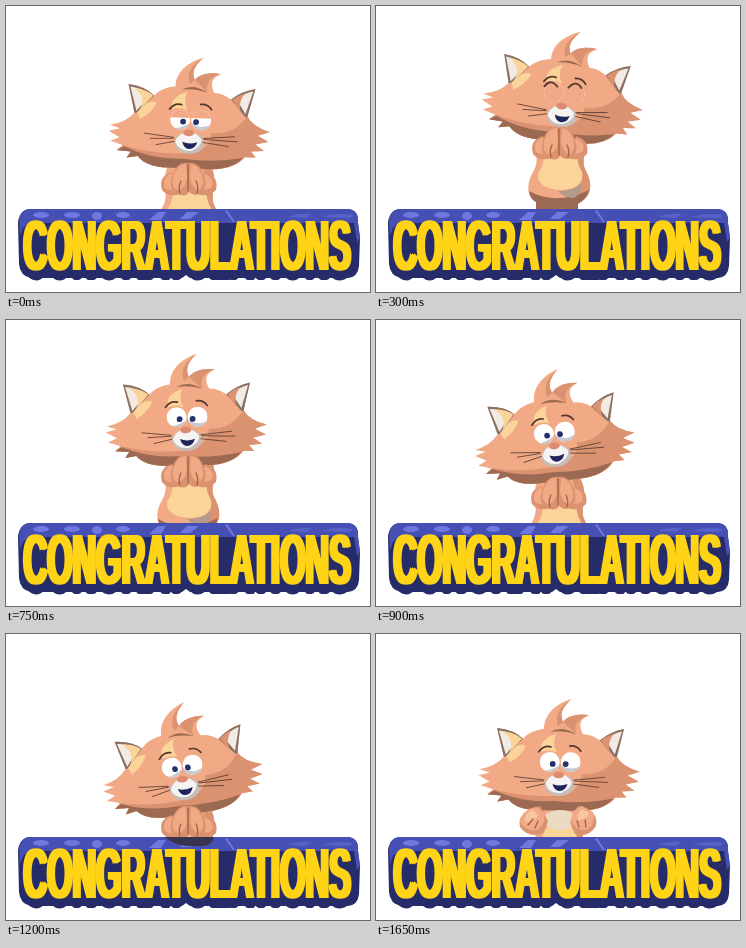
An HTML page without scripts for the animation above (1.8 s loop, 364 by 286 pixels).

```html
<!DOCTYPE html>
<html lang="en">
<head>
<meta charset="utf-8">
<title>Congratulations</title>
<style>
  html, body { margin: 0; width: 100%; height: 100%; overflow: hidden; background: #fff; }
  svg { display: block; width: 364px; height: 286px; }

  .head, .body, .lids, .shut, .clasped, .apart, .reflection { animation: 1.8s step-end infinite; }
  .head { animation-name: nod; transform-origin: 184.5px 94.5px; }
  .body { animation-name: bob; }
  .lids { animation-name: blink; }
  .shut { animation-name: shut; }
  .clasped { animation-name: clasp; }
  .apart { animation-name: part; }
  .reflection { animation-name: reflect; }

  @keyframes nod {
    0%      { translate: 1.5px -14px;  rotate: 2.3deg; }
    8.333%  { translate: 5px -29px;    rotate: 4deg; }
    16.666% { translate: 7px -40.5px;  rotate: 5.5deg; }
    25%     { translate: 5px -47px;    rotate: 6deg; }
    33.333% { translate: 2px -43.5px;  rotate: 4.5deg; }
    41.666% { translate: -4px -31px;   rotate: -1deg; }
    50%     { translate: -10px -15px;  rotate: -6.6deg; }
    58.333% { translate: -13px -2px;   rotate: -8.5deg; }
    66.666% { translate: -13px 4.5px;  rotate: -8deg; }
    75%     { translate: -9px 5px;     rotate: -5deg; }
    83.333% { translate: -5px 4.5px;   rotate: -1.8deg; }
    91.666% { translate: 0 0;          rotate: .5deg; }
  }
  @keyframes bob {
    0%      { translate: -1px 36px; }
    8.333%  { translate: 0 16px; }
    16.666% { translate: 0 0; }
    25%     { translate: 0 -5px; }
    33.333% { translate: 0 -2px; }
    41.666% { translate: -1px 14px; }
    50%     { translate: -1px 36px; }
    58.333% { translate: -1px 48px; }
    66.666%, 75%, 83.333%, 91.666% { translate: -1px 51px; }
  }
  @keyframes blink {
    0%     { translate: 0 -14px; }
    8.333% { translate: 0 0; }
    25%    { translate: 0 -14px; }
    33.333%, 100% { translate: 0 -26px; }
  }
  @keyframes shut {
    0%     { visibility: hidden; }
    8.333% { visibility: visible; }
    25%, 100% { visibility: hidden; }
  }
  @keyframes clasp { 0% { visibility: visible; } 91.666%, 100% { visibility: hidden; } }
  @keyframes part  { 0% { visibility: hidden; } 91.666%, 100% { visibility: visible; } }
  @keyframes reflect {
    0%      { visibility: hidden; }
    58.333% { visibility: visible; }
    91.666%, 100% { visibility: hidden; }
  }

  .fur { fill: #f2aa86; }
  .pale { fill: #f8c4a2; }
  .shade { fill: #db9270; }
  .deep { fill: #9c6a53; }
  .cream { fill: #fbd49a; }
  .line { fill: none; stroke: #54382f; stroke-width: .8; stroke-linecap: round; }
  .fold { fill: none; stroke: #a5613f; stroke-width: 1.3; stroke-linecap: round; }
  .word { font: bold 70px "Liberation Sans", Arial, sans-serif; }
</style>
</head>
<body>
<svg viewBox="0 0 364 286">
  <defs>
    <clipPath id="above"><path d="M0 0H364V212H0Z"/></clipPath>
    <clipPath id="eyes">
      <ellipse cx="174" cy="128" rx="10" ry="10"/>
      <ellipse cx="195" cy="128" rx="10" ry="10"/>
    </clipPath>
    <g id="word" class="word" transform="translate(17.5 264) scale(.467 1)">
      <text>CONGRATULATIONS</text>
    </g>
  </defs>

  <g clip-path="url(#above)">
    <g class="body">
      <path class="fur" d="M164 122C154 140 166 152 157 166C149 180 152 192 160 196V224H202V197C216 192 217 178 210 165C203 152 215 140 205 122Z"/>
      <path class="shade" d="M205 122C215 140 203 152 210 165C217 178 216 192 202 197L194 198C206 188 208 174 203 164C198 152 203 140 197 122Z"/>
      <path class="cream" d="M168 144Q185 138 202 145Q200 156 206 166Q209 182 186 184Q161 183 162 168Q169 158 168 144Z"/>
      <path class="deep" d="M153 185Q180 200 213 184Q211 193 202 198V224H188L186 200L182 224H160V196Q154 193 153 185Z"/>
      <path fill="#b39a8c" d="M182 185Q198 185 205 177Q207 187 198 192Q188 192 182 185Z"/>
    </g>
  </g>

  <g class="head">
    <path class="fur" d="M128 123L121 94.5Q138 96 147 105Q154 97 168 95C168 80 180 70 195 65C187 73 183 79 187 88C191 82 202 79 213 81C204 85 202 90 207 100Q216 100 224 106Q235 97 248 94.5L241 122Q246 132 264 137L252 141L263 147L250 150L259 156L246 157L251 163L240 163Q230 176 205 176.500H163Q141 176 133 166L122 168L126 162L112 161L119 155L105 152L114 148L103 142L114 139L104 136Q120 133 128 123Z"/>
    <path class="cream" d="M166 118Q162 106 180 100Q176 110 181 118Q172 115 166 118ZM130 121Q141 109 150 112Q146 122 134 129Z"/>
    <path class="shade" d="M241 122Q246 132 264 137L252 141L263 147L250 150L259 156L246 157L251 163L240 163Q230 176 205 176.500H163Q141 176 133 166L122 168L126 162L112 161L119 155L105 152Q140 164 176 162Q206 160 206 140Q228 142 241 122Z"/>
    <path class="deep" d="M122 168L126 162L112 161L119 157Q146 169 178 167Q210 170 238 164Q228 176 205 176.500H163Q141 176 133 166Z"/>
    <path class="shade" d="M187 88C191 82 202 79 213 81C202 84 198 90 200 100Q193 93 187 88ZM195 65C183 73 178 82 182 92L187 88C183 79 187 73 195 65Z"/>
    <path class="deep" d="M174 98Q186 91 200 100Q186 96 174 98Z"/>

    <path fill="#8b7164" d="M121 94.500Q138 96 147 105L130 123H128ZM248 94.500Q235 97 224 106L239 123H241Z"/>
    <path fill="#f2ebe4" d="M123 97Q136 98 142 106L130 121ZM246 97Q236 99 230 106L239 120Z"/>
    <path class="cream" d="M127 98Q139 99 146 105L133 120Q140 107 127 98Z"/>
    <path class="shade" d="M238 99Q230 102 225 106L234 118Q231 108 238 99Z"/>

    <ellipse fill="#c6bdb9" cx="184" cy="151" rx="15" ry="11"/>
    <path fill="#f6f4f3" d="M183 140Q191 140 196 147Q197 154 186 159Q173 160 170 150Q173 141 183 140Z"/>
    <path fill="#20245c" d="M177 150Q184 153 192 150Q190 157 184 157Q179 157 177 150Z"/>
    <ellipse fill="#dc8a70" cx="183" cy="141" rx="5.500" ry="3.300"/>
    <path class="line" d="M168 146L139 143M168 147L145 148M169 150L151 154M198 146L229 143M199 147L232 148M198 150L223 153"/>

    <g clip-path="url(#eyes)">
      <path fill="#fff" d="M160 114H208V140H160Z"/>
      <path fill="#c6c9d2" d="M160 136Q174 139 185 130Q195 139 208 130V140H160Z"/>
      <g fill="#26306c">
        <circle cx="177" cy="130" r="2.900"/>
        <circle cx="190" cy="130" r="2.900"/>
      </g>
      <path class="lids fur" d="M160 113H208V140H160Z"/>
    </g>
    <path class="line" style="stroke-width:1.700" d="M163 118Q168 111 175 113M194 112Q201 111 205 117"/>
    <path class="shut line" style="stroke-width:1.800" d="M164 123Q170 114 177 122M188 122Q195 113 201 121"/>
  </g>

  <g clip-path="url(#above)">
    <g class="body">
      <g class="clasped">
        <path class="shade" d="M167 130Q153 134 157 148Q163 156 175 152ZM200 130Q214 134 211 148Q204 156 192 152Z"/>
        <path class="fur" d="M167 131Q156 136 160 146Q166 150 173 146ZM200 132Q210 137 207 145Q202 150 194 146Z"/>
        <path class="shade" d="M183 121Q172 119 167 134Q163 149 172 152Q181 156 184 150Q190 156 197 150Q203 145 199 133Q194 119 183 121Z"/>
        <path class="fur" d="M181 122Q172 122 168 135Q166 147 173 148Q181 146 182 136ZM186 122Q195 123 198 136Q199 146 193 148Q187 146 185 136Z"/>
        <path class="fold" d="M183 123V149M176 139Q173 145 175 151M191 139Q194 145 192 151"/>
      </g>
      <g class="apart">
        <ellipse fill="#eadbc2" cx="185" cy="135" rx="17" ry="10"/>
        <path class="shade" d="M165 121Q141 127 145 142Q154 154 169 148L173 136ZM203 121Q224 125 221 141Q214 153 200 149L195 137Z"/>
        <path class="fur" d="M162 122Q148 123 145 137Q151 147 162 145Q171 140 169 128ZM207 121Q196 124 196 136Q201 146 211 145Q221 140 218 127Z"/>
        <path class="pale" d="M158 125Q149 128 150 136Q158 139 163 130ZM207 124Q201 128 203 135Q212 136 214 128Z"/>
        <path class="fold" d="M153 140L158 134M160 143L163 136M204 142L202 136M211 142L210 135"/>
      </g>
    </g>
  </g>

  <g>
    <use href="#word" fill="#252c69" stroke="#252c69" stroke-width="20" stroke-linejoin="round"/>
    <path fill="#252c69" d="M12 216Q14 203 25 203H342Q353 204 352 217L354 232L353 260Q352 271 342 272H184L180 269L176 272H25Q14 270 13 258Z"/>
    <path fill="#4650b4" d="M13 216Q14 203 25 203H342Q353 204 352 217L354 232L351 236L348 217H23L17 222L14 230Z"/>
    <g fill="#6f78e0">
      <ellipse cx="35" cy="209" rx="8" ry="3"/>
      <ellipse cx="66" cy="209" rx="8" ry="3"/>
      <ellipse cx="91" cy="210" rx="5" ry="4"/>
      <ellipse cx="117" cy="209" rx="7" ry="3"/>
      <path d="M143 214L152 206H160L155 214ZM174 213L181 206H193L184 213ZM221 204L229 216H227L219 205Z"/>
    </g>
    <path fill="#5762c8" d="M283 211Q290 207 306 208L300 212ZM316 211Q330 206 347 209L344 212Z"/>
    <path class="reflection" fill="#38344f" d="M159 203H208Q207 212 195 212H180Q166 210 159 203Z"/>
    <g fill="#ffd416">
      <use href="#word" x="-1.900"/>
      <use href="#word"/>
      <use href="#word" x="1.900"/>
    </g>
  </g>
</svg>
</body>
</html>
```
